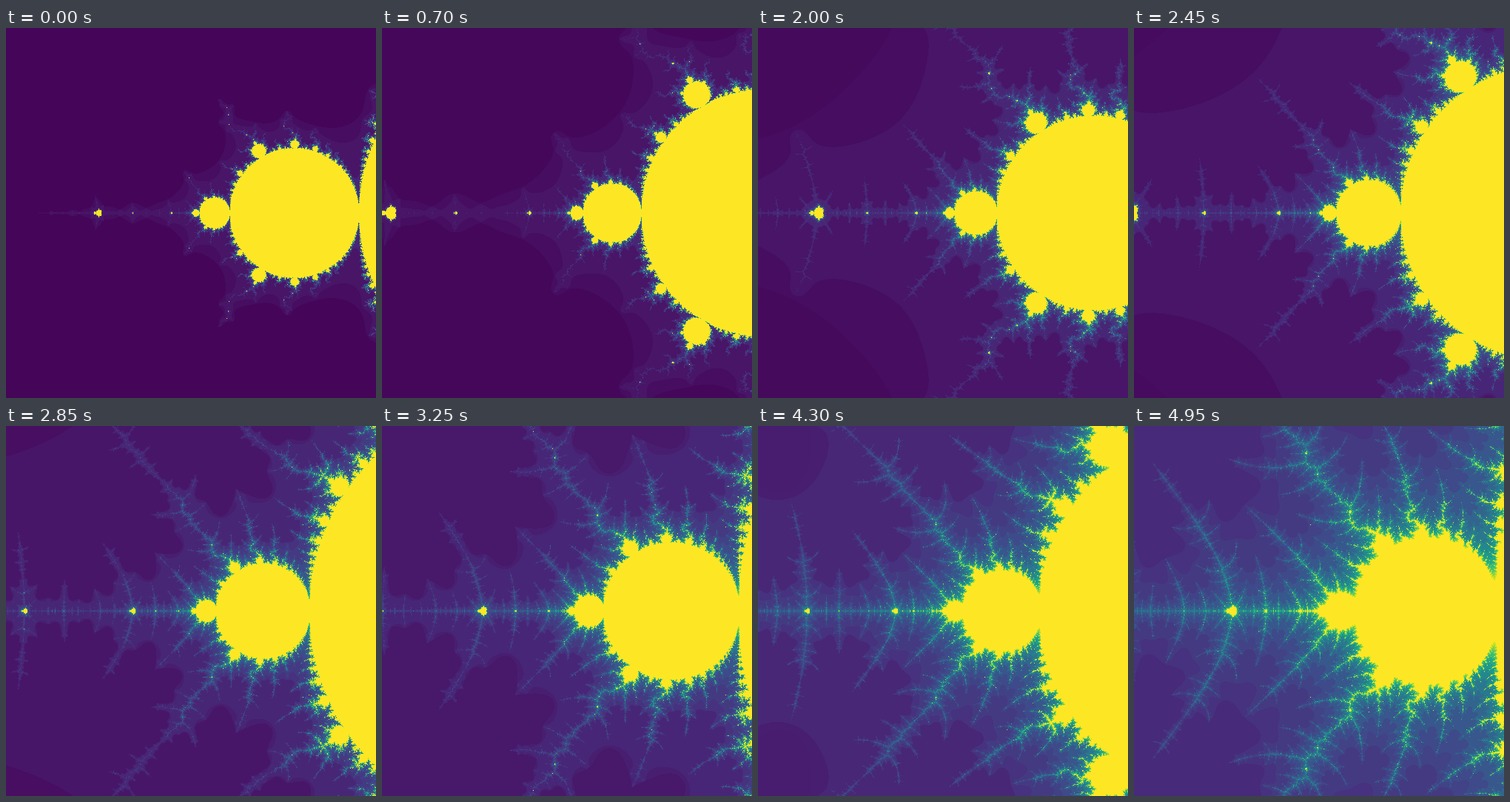
These frames come from a looping animation (500 by 500 pixels, 5000 ms). An HTML page with a canvas:

```html
<!DOCTYPE html>
<html lang="en">
<head>
<meta charset="utf-8">
<title>Period-doubling zoom</title>
<style>
  html, body { margin: 0; width: 100%; height: 100%; overflow: hidden; background: #440154; }
  canvas { display: block; width: 500px; height: 500px; }
</style>
</head>
<body>
<canvas id="view" width="500" height="500"></canvas>
<script>
const SIZE = 500, HALF = SIZE / 2;
const STEPS = 100, STEP_MS = 50;
const LAST = 255;                 // count of points that never escape
const CENTER = -1.401155189;      // Feigenbaum point
const DELTA = 4.669201609;        // Feigenbaum constant
const START_SCALE = 349;          // pixels per unit

const stops = ('440154 481568 482677 453781 3f4788 39558c 32648e 2d718e 287d8e 238a8d ' +
  '1f968b 20a386 29af7f 3cbc75 56c667 74d055 94d840 b8de29 dce318 fde725')
  .split(' ').map(hex => [0, 2, 4].map(i => parseInt(hex.slice(i, i + 2), 16)));

function viridis(t) {
  const pos = t * (stops.length - 1);
  const i = Math.min(Math.floor(pos), stops.length - 2);
  return stops[i].map((v, k) => Math.round(v + (stops[i + 1][k] - v) * (pos - i)));
}
const ramp = Array.from({ length: LAST + 1 }, (_, n) => viridis(n / LAST));

// Colours that agree in the top 4 bits of each channel share their mean in the picture.
function reducedPalette(counts) {
  const weights = new Uint32Array(LAST + 1);
  for (const n of counts) weights[n]++;
  const bins = new Map();
  const binOf = ramp.map((rgb, n) => {
    const key = rgb.map(v => v >> 4).join();
    if (!bins.has(key)) bins.set(key, { sum: [0, 0, 0], total: 0 });
    const bin = bins.get(key);
    rgb.forEach((v, k) => bin.sum[k] += v * weights[n]);
    bin.total += weights[n];
    return bin;
  });
  return Uint32Array.from(binOf, ({ sum, total }) => {
    const [r, g, b] = sum.map(v => Math.round(v / (total || 1)));
    return (255 << 24 | b << 16 | g << 8 | r) >>> 0;
  });
}

function escapeCount(cx, cy) {
  // Main cardioid and period-2 disc never escape
  const yy = cy * cy, u = cx - 0.25, q = u * u + yy;
  if (q * (q + u) < 0.25 * yy || (cx + 1) * (cx + 1) + yy < 0.0625) return LAST;
  let x = cx, y = cy, x2 = x * x, y2 = yy, n = 0;
  while (n < LAST && x2 + y2 <= 4) {
    y = 2 * x * y + cy;
    x = x2 - y2 + cx;
    x2 = x * x;
    y2 = y * y;
    n++;
  }
  return n;
}

// Only the lower half is computed; the set mirrors across the real axis.
function computeHalf(step) {
  const scale = START_SCALE * Math.pow(DELTA, 3 * step / STEPS);
  const counts = new Uint8Array(SIZE * HALF);
  for (let row = 0, i = 0; row < HALF; row++) {
    const cy = (row + 0.5) / scale;
    for (let col = 0; col < SIZE; col++) {
      counts[i++] = escapeCount(CENTER + (col + 0.5 - HALF) / scale, cy);
    }
  }
  return { counts, palette: reducedPalette(counts) };
}

const ctx = document.getElementById('view').getContext('2d');
const image = ctx.createImageData(SIZE, SIZE);
const pixels = new Uint32Array(image.data.buffer);
const cache = [];
let shown = -1;

function draw(step) {
  const { counts, palette } = cache[step] || (cache[step] = computeHalf(step));
  for (let row = 0, i = 0; row < HALF; row++) {
    let below = (HALF + row) * SIZE, above = (HALF - 1 - row) * SIZE;
    for (let col = 0; col < SIZE; col++) {
      pixels[below++] = pixels[above++] = palette[counts[i++]];
    }
  }
  ctx.putImageData(image, 0, 0);
  shown = step;
}

const start = performance.now();
function tick() {
  const step = Math.floor((performance.now() - start) / STEP_MS) % STEPS;
  if (step !== shown) draw(step);
  requestAnimationFrame(tick);
}
draw(0);
requestAnimationFrame(tick);
</script>
</body>
</html>
```
